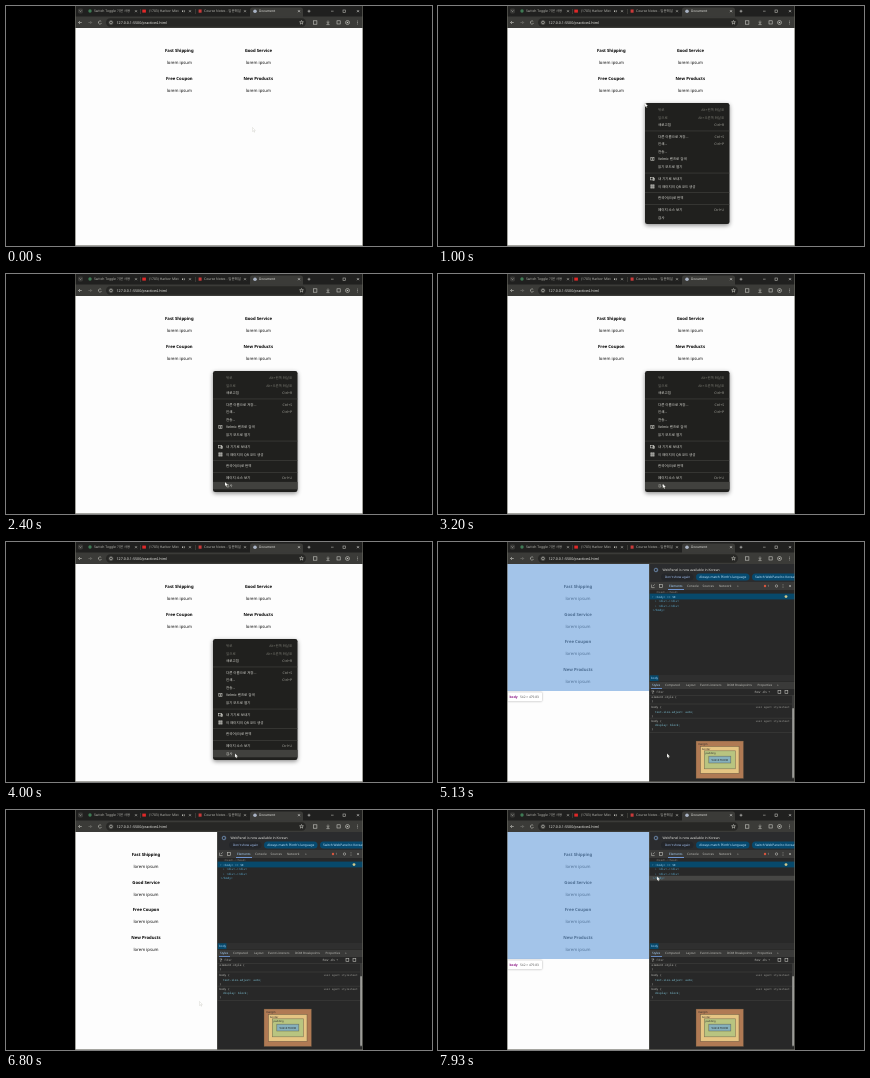
Animation, 426 px wide and 240 px high, one loop 8 s. Source, as an HTML page with a canvas:

```html
<!DOCTYPE html>
<html lang="ko">
<head>
<meta charset="utf-8">
<title>Document</title>
<style>
html, body { margin: 0; width: 100%; height: 100%; overflow: hidden; background: #000; }
canvas { display: block; width: 100vw; height: 100vh; }
</style>
</head>
<body>
<canvas id="stage"></canvas>
<script>
const W = 426, H = 240, LOOP = 8000;
const LEFT = 69, RIGHT = 357, TOP = 22, SPLIT = 211;
const MENU_OPEN = 860, PANEL_OPEN = 4600, INSPECT_END = 5550;
const UI = '"Noto Sans", "Noto Sans CJK KR", "Noto Sans CJK", sans-serif';
const MONO = '"Noto Sans Mono", "DejaVu Sans Mono", monospace';

const canvas = document.getElementById('stage');
const ctx = canvas.getContext('2d');

function rect(x, y, w, h, color) {
  ctx.fillStyle = color;
  ctx.fillRect(x, y, w, h);
}

function pill(x, y, w, h, r, color) {
  ctx.fillStyle = color;
  ctx.beginPath();
  ctx.roundRect(x, y, w, h, r);
  ctx.fill();
}

function dot(x, y, r, color) {
  ctx.fillStyle = color;
  ctx.beginPath();
  ctx.arc(x, y, r, 0, Math.PI * 2);
  ctx.fill();
}

function ring(x, y, r, color, from = 0, to = Math.PI * 2) {
  ctx.strokeStyle = color;
  ctx.lineWidth = 0.6;
  ctx.beginPath();
  ctx.arc(x, y, r, from, to);
  ctx.stroke();
}

function line(color, ...pts) {
  ctx.strokeStyle = color;
  ctx.lineWidth = 0.6;
  ctx.beginPath();
  for (let i = 0; i < pts.length; i += 2) ctx.lineTo(pts[i], pts[i + 1]);
  ctx.stroke();
}

function box(x, y, w, h, color) {
  ctx.strokeStyle = color;
  ctx.lineWidth = 0.6;
  ctx.strokeRect(x, y, w, h);
}

// y is the vertical middle of the capitals
function text(str, x, y, size, color, { align = 'left', bold = false, font = UI } = {}) {
  ctx.font = `${bold ? 'bold ' : ''}${size}px ${font}`;
  ctx.textAlign = align;
  ctx.fillStyle = color;
  ctx.fillText(str, x, y + size * 0.36);
}

function clip(x, y, w, h, draw) {
  ctx.save();
  ctx.beginPath();
  ctx.rect(x, y, w, h);
  ctx.clip();
  draw();
  ctx.restore();
}

function cross(x, y, color) {
  line(color, x - 1, y - 1, x + 1, y + 1);
  line(color, x + 1, y - 1, x - 1, y + 1);
}

function plus(x, y, color) {
  line(color, x - 1.4, y, x + 1.4, y);
  line(color, x, y - 1.4, x, y + 1.4);
}

/* ---------- browser frame ---------- */

function drawTabs() {
  const ink = '#b4b4ae';
  rect(LEFT, 0, RIGHT - LEFT, 11, '#20201f');
  pill(72, 2.5, 5, 5, 1.4, '#383836');
  line(ink, 73.4, 4.5, 74.5, 5.6, 75.6, 4.5);

  dot(84, 5, 1.7, '#3f7a55');
  clip(87, 0, 40, 11, () => text('Switch Toggle 기본 사용', 88, 5.2, 3.4, ink));
  cross(130, 5.2, ink);
  rect(134.5, 3, 0.5, 5, '#55554f');

  rect(136.3, 3.6, 3.6, 3, '#e02828');
  clip(142, 0, 31, 11, () => text('(1703) Harbor Mist | 모음', 143, 5.2, 3.4, ink));
  rect(176, 4.4, 1.2, 1.6, ink);
  ring(177.2, 5.2, 1.4, ink, -1, 1);
  cross(184, 5.2, ink);
  rect(189, 3, 0.5, 5, '#55554f');

  rect(192.6, 3.5, 3, 3.2, '#c93a3a');
  clip(197, 0, 40, 11, () => text('Course Notes - 입문해설', 198, 5.2, 3.4, ink));
  cross(239, 5.2, ink);

  pill(244, 1.5, 53, 11, [2.5, 2.5, 0, 0], '#3b3b38');
  dot(249, 5.2, 1.8, '#a9b3c4');
  text('Document', 253, 5.3, 3.3, '#e6e6e2');
  cross(293, 5.2, '#dcdcd8');
  plus(303, 5.2, '#dcdcd8');

  line(ink, 325, 5.2, 327.6, 5.2);
  box(337, 4, 2.4, 2.4, ink);
  cross(352, 5.2, '#dcdcd8');
}

function drawToolbar() {
  const ink = '#c8c8c2';
  rect(LEFT, 10.5, RIGHT - LEFT, TOP - 10.5, '#3b3b38');
  line(ink, 75.8, 16.5, 72.6, 16.5);
  line(ink, 74, 15, 72.5, 16.5, 74, 18);
  line('#777772', 82.4, 16.5, 85.6, 16.5);
  line('#777772', 84.2, 15, 85.7, 16.5, 84.2, 18);
  ring(94, 16.5, 1.6, ink, 0.4, 5.6);
  pill(100, 12.3, 200, 8.5, 4.2, '#272725');
  dot(105, 16.5, 2.6, '#3b3b38');
  ring(105, 16.5, 1.4, ink);
  text('127.0.0.1:5500/practice4.html', 110.5, 16.5, 3.65, '#e8e8e4');

  const star = [];
  for (let i = 0; i <= 10; i++) {
    const a = i * Math.PI / 5 - Math.PI / 2, r = i % 2 ? 0.9 : 2;
    star.push(295.5 + r * Math.cos(a), 16.5 + r * Math.sin(a));
  }
  line(ink, ...star);
  box(307.5, 14.8, 3.4, 3.4, ink);
  line(ink, 322, 14.6, 322, 17.4);
  line(ink, 320.6, 16.2, 322, 17.5, 323.4, 16.2);
  line(ink, 320.4, 18.6, 323.6, 18.6);
  box(331, 14.8, 3.2, 3.2, ink);
  ring(341.5, 16.5, 2, ink);
  dot(341.5, 16.5, 0.8, ink);
  for (const d of [-1.5, 0, 1.5]) dot(351.5, 16.5 + d, 0.45, ink);
}

/* ---------- page ---------- */

const CARDS = ['Fast Shipping', 'Good Service', 'Free Coupon', 'New Products'];

function drawPage(narrow, marked) {
  const right = narrow ? SPLIT : RIGHT;
  rect(LEFT, TOP, right - LEFT, H - TOP, '#fdfdfd');
  CARDS.forEach((title, i) => {
    const x = narrow ? 140 : i % 2 ? 252.3 : 173.3;
    const y = 44.6 + 27.65 * (narrow ? i : i >> 1);
    text(title, x, y, 4.25, '#000', { align: 'center', bold: true });
    text('lorem ipsum', x, y + 12, 4.25, '#111', { align: 'center' });
  });
  if (marked) {
    rect(LEFT, TOP, SPLIT - LEFT, 127, 'rgba(118,168,224,0.66)');
    ctx.save();
    ctx.shadowColor = 'rgba(0,0,0,0.4)';
    ctx.shadowBlur = 2;
    pill(69.5, 150.2, 34.5, 9, 0.8, '#fff');
    ctx.restore();
    text('body', 71.5, 155, 3.3, '#881280', { bold: true });
    text('542 × 479.83', 82, 155, 3.2, '#555');
  }
}

/* ---------- context menu ---------- */

const MENU = { x: 207, y: 97, w: 84.5, h: 121 };
const ITEMS = [
  [104, '뒤로', 'Alt+왼쪽 화살표'],
  [111.4, '앞으로', 'Alt+오른쪽 화살표'],
  [118.8, '새로고침', 'Ctrl+R'],
  [130.5, '다른 이름으로 저장...', 'Ctrl+S'],
  [138, '인쇄...', 'Ctrl+P'],
  [145.5, '전송...'],
  [153, 'Velmic 렌즈로 검색'],
  [160.6, '읽기 모드로 열기'],
  [172.8, '내 기기로 보내기'],
  [180.4, '이 페이지의 QR 코드 생성'],
  [192.2, '한국어(으)로 번역'],
  [204, '페이지 소스 보기', 'Ctrl+U'],
  [211.6, '검사']
];

function drawMenu(mouse) {
  ctx.save();
  ctx.shadowColor = 'rgba(0,0,0,0.45)';
  ctx.shadowBlur = 4;
  ctx.shadowOffsetY = 1.5;
  pill(MENU.x, MENU.y, MENU.w, MENU.h, 2.2, '#20201e');
  ctx.restore();
  for (const y of [124.7, 166.8, 186.5, 198.2]) rect(MENU.x, y, MENU.w, 0.5, '#4a4a46');
  ITEMS.forEach(([y, label, keys], i) => {
    const ink = i < 2 ? '#77776f' : '#deded8';
    const over = mouse.x > MENU.x + 1 && Math.abs(mouse.y - y) < 3.75;
    if (over && i > 1) rect(MENU.x, y - 3.7, MENU.w, 7.4, '#41413e');
    text(label, 220, y, 3.5, ink);
    if (keys) text(keys, 286, y, 3.4, i < 2 ? '#77776f' : '#a5a59e', { align: 'right' });
  });
  const ink = '#c8c8c2';
  box(212.8, 151.4, 3.2, 3.2, ink);
  dot(214.4, 153, 0.8, ink);
  box(212.4, 171.3, 3.4, 2.6, ink);
  box(215, 172.4, 1.6, 2.2, ink);
  for (const dx of [0, 2]) for (const dy of [0, 2]) box(212.8 + dx, 178.8 + dy, 1.3, 1.3, ink);
}

/* ---------- inspector ---------- */

function drawNotice() {
  rect(SPLIT, TOP, RIGHT - SPLIT, 18, '#2b2c2e');
  ring(218, 28, 1.8, '#8ab4e8');
  text('i', 218, 28, 2.8, '#8ab4e8', { align: 'center' });
  text('WebPanel is now available in Korean', 224.5, 28, 3.35, '#e4e4e0');
  pill(223, 31.5, 32.5, 7, 3.5, '#24262a');
  text("Don't show again", 239.5, 35, 3.1, '#a8c7fa', { align: 'center' });
  pill(258, 31.5, 53.5, 7, 3.5, '#064a70');
  text("Always match Plinth's language", 284.8, 35, 3.2, '#c2e7ff', { align: 'center' });
  pill(314, 31.5, 50, 7, 3.5, '#064a70');
  text('Switch WebPanel to Korean', 317, 35, 3.2, '#c2e7ff');
}

function drawTree(mouse) {
  const tag = '#5db0d7', dim = '#8c8c88', ink = '#bdbdb8', font = MONO;
  rect(SPLIT, 40, RIGHT - SPLIT, 8, '#3a3a39');
  line(ink, 213.6, 42.6, 213.6, 45.6, 216.6, 45.6);
  line(ink, 215, 44, 216.8, 42.4);
  box(221.5, 42.4, 3, 3.2, ink);
  [['Elements', 231], ['Console', 249], ['Sources', 264.5], ['Network', 281], ['»', 299]]
    .forEach(([s, x], i) => text(s, x, 44, 3.1, i ? ink : '#a8d4ff'));
  rect(230, 47.2, 16, 0.8, '#7cacf8');
  dot(327, 44, 1.2, '#d9573f');
  text('1', 329.5, 44, 3.1, ink);
  ring(338.5, 44, 1.2, ink);
  for (const d of [-1.3, 0, 1.3]) dot(345, 44 + d, 0.4, ink);
  cross(352, 44, ink);

  rect(SPLIT, 48, RIGHT - SPLIT, 85, '#282828');
  text('<head>…</head>', 218, 49.8, 2.6, dim, { font });
  rect(SPLIT, 51.6, RIGHT - SPLIT, 5.8, '#07496b');
  text('▾ <body> == $0', 214, 54.5, 2.8, '#9ad0ee', { font });
  dot(348, 54.6, 1.4, '#d0c88c');
  if (mouse.x > SPLIT && Math.abs(mouse.y - 67.5) < 2.6) {
    rect(SPLIT, 65.8, RIGHT - SPLIT, 4.8, '#464644');
  }
  text('▸ <div>…</div>', 217, 59.2, 2.9, tag, { font });
  text('▸ <div>…</div>', 217, 63.8, 2.9, tag, { font });
  text('</body>', 214.5, 68.3, 2.9, tag, { font });

  rect(SPLIT, 133, RIGHT - SPLIT, 6.4, '#2f2f2f');
  rect(SPLIT + 0.5, 133.3, 9, 5.8, '#07496b');
  text('body', 213, 136.2, 3, '#a8d4ff');
}

const CSS_LINES = [
  [155.3, 213.5, 'element.style {'],
  [159, 213.5, '}'],
  [165.3, 213.5, 'body {', 1],
  [169.6, 217, 'text-size-adjust: auto;'],
  [173.6, 213.5, '}'],
  [178.9, 213.5, 'body {', 1],
  [183.1, 217, 'display: block;'],
  [187.3, 213.5, '}']
];

function drawStyles() {
  const ink = '#bdbdb8';
  rect(SPLIT, 139.4, RIGHT - SPLIT, 7.6, '#3a3a39');
  [['Styles', 214], ['Computed', 227], ['Layout', 248], ['Event Listeners', 262],
    ['DOM Breakpoints', 289], ['Properties', 319.5], ['»', 339]]
    .forEach(([s, x], i) => text(s, x, 143, 3, i ? ink : '#a8d4ff'));
  rect(213, 146.3, 11, 0.7, '#7cacf8');

  rect(SPLIT, 147, RIGHT - SPLIT, H - 147, '#282828');
  line(ink, 213.5, 149, 216, 149, 214.8, 150.6, 214.8, 151.8);
  text('Filter', 218.5, 150, 3, '#9a9a95');
  text(':hov  .cls  +', 316, 150, 3.2, ink);
  box(340, 148.5, 2.8, 2.8, ink);
  box(347, 148.5, 2.8, 2.8, ink);
  for (const y of [153, 161.8, 175.9, 190]) rect(SPLIT, y, RIGHT - SPLIT, 0.4, '#4a4a48');
  for (const [y, x, s, agent] of CSS_LINES) {
    text(s, x, y, 2.8, x > 215 ? '#7fc4d8' : '#c4c4bf', { font: MONO });
    if (agent) text('user agent stylesheet', 351.5, y, 2.7, '#9a9a95', { align: 'right', font: MONO });
  }
  rect(354, 153, 2, 84, '#3a3a39');
  pill(354.2, 166, 1.8, 70, 0.9, '#9c9c98');

  // nested box model
  [['#b07a54', 258, 199, 47.5, 37.5], ['#e6c583', 262.5, 204.5, 38.5, 26.8],
    ['#b8c480', 266.3, 208.8, 31, 18], ['#86b0bc', 270.8, 214.2, 22, 6.8]]
    .forEach(([c, x, y, w, h]) => {
      rect(x, y, w, h, c);
      box(x, y, w, h, 'rgba(74,68,54,0.6)');
    });
  text('margin', 260, 201.8, 2.8, '#2a2a2a');
  text('border', 264, 206.8, 2.6, '#2a2a2a');
  text('padding', 267.5, 211.3, 2.6, '#2a2a2a');
  text('542×479.830', 281.8, 217.7, 2.8, '#222', { align: 'center' });
}

function drawInspector(mouse) {
  clip(SPLIT, TOP, RIGHT - SPLIT, H - TOP, () => {
    drawNotice();
    drawTree(mouse);
    drawStyles();
    rect(SPLIT, TOP, 0.6, H - TOP, '#55554f');
  });
}

/* ---------- pointer ---------- */

// time, x, y
const PATH = [
  [0, 246.5, 121.5], [150, 246.5, 121.5], [760, 207, 97], [1150, 207, 97],
  [2250, 219, 208], [2700, 219, 208], [3600, 229, 211.5], [5450, 229, 211.5],
  [6500, 193.5, 191.5], [6900, 193.5, 191.5], [7650, 219, 66.5], [LOOP, 219, 66.5]
];

function pointer(t) {
  const i = Math.max(1, PATH.findIndex(p => p[0] > t));
  const [t0, x0, y0] = PATH[i - 1], [t1, x1, y1] = PATH[i];
  const u = (t - t0) / (t1 - t0), k = u * u * (3 - 2 * u);
  return { x: x0 + (x1 - x0) * k, y: y0 + (y1 - y0) * k };
}

function drawPointer({ x, y }) {
  ctx.beginPath();
  for (const [dx, dy] of [[0, 0], [0, 4], [1, 3.2], [1.7, 4.8], [2.3, 4.5], [1.6, 3], [2.9, 2.9]]) {
    ctx.lineTo(x + dx, y + dy);
  }
  ctx.closePath();
  ctx.fillStyle = '#fff';
  ctx.fill();
  ctx.strokeStyle = 'rgba(70,70,40,0.35)';
  ctx.lineWidth = 0.3;
  ctx.stroke();
}

function draw(t) {
  const mouse = pointer(t);
  const panel = t >= PANEL_OPEN;
  const menu = t >= MENU_OPEN && !panel;
  const overTree = mouse.x > SPLIT && mouse.y > 51 && mouse.y < 71;
  const marked = panel && (t < INSPECT_END || overTree);

  rect(0, 0, W, H, '#000');
  clip(LEFT, 0, RIGHT - LEFT, H, () => {
    drawPage(panel, marked);
    drawTabs();
    drawToolbar();
    if (panel) drawInspector(mouse);
    if (menu) drawMenu(mouse);
    box(LEFT + 0.3, -1, RIGHT - LEFT - 0.6, H + 0.7, '#6a6a62');
  });
  drawPointer(mouse);
}

function resize() {
  const dpr = window.devicePixelRatio || 1;
  canvas.width = Math.round(innerWidth * dpr);
  canvas.height = Math.round(innerHeight * dpr);
  ctx.setTransform(canvas.width / W, 0, 0, canvas.height / H, 0, 0);
  ctx.textRendering = 'geometricPrecision';
}

addEventListener('resize', resize);
resize();

const start = performance.now();
function tick() {
  draw((performance.now() - start) % LOOP);
  requestAnimationFrame(tick);
}
tick();
</script>
</body>
</html>
```
